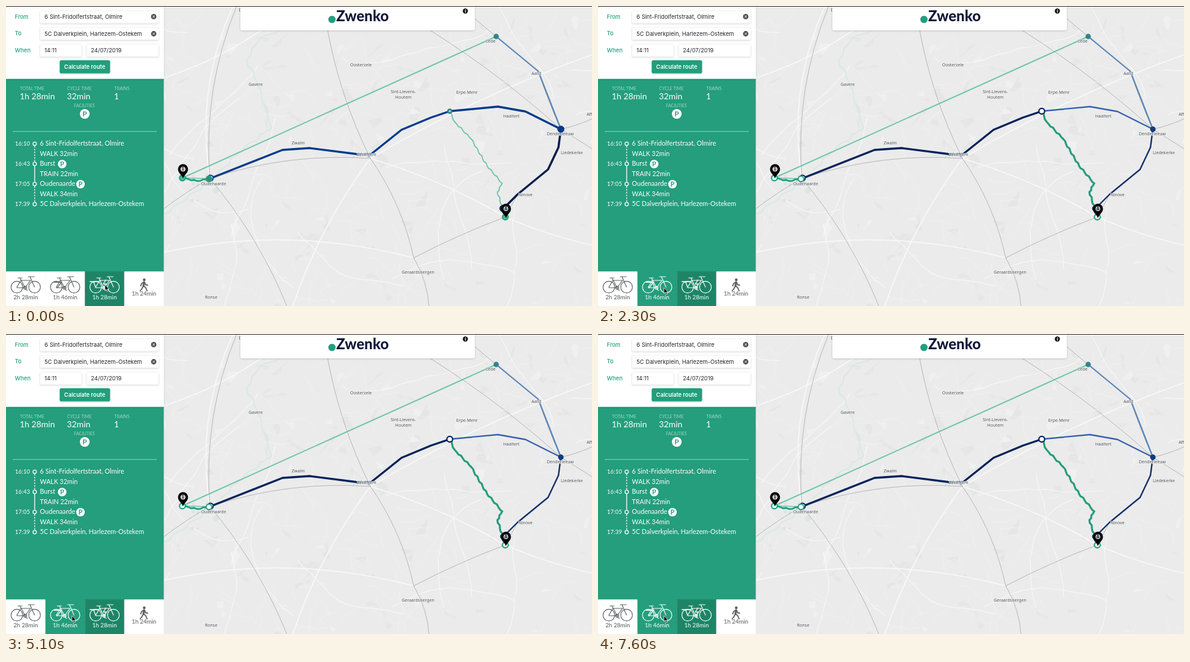
These frames come from a looping animation (960x492 px, 7.7 s). An HTML page:

```html
<!DOCTYPE html>
<html lang="nl">
<head>
<meta charset="utf-8">
<title>Route planner</title>
<style>
  html, body { margin: 0; width: 100%; height: 100%; overflow: hidden; background: #ebebeb; }
  svg { display: block; width: 960px; height: 492px; }
  text { font-family: Lato, "Liberation Sans", sans-serif; }
  .form text { font-family: Inter, "Liberation Sans", sans-serif; }
  .labels text { font: 7px "Noto Sans", "Open Sans", sans-serif; fill: #50565a; text-anchor: middle;
    stroke: #f1f1f1; stroke-width: 1.4px; paint-order: stroke; stroke-linejoin: round; }
  .line { fill: none; stroke-linejoin: round; stroke-linecap: round; }
</style>
</head>
<body>
<svg viewBox="0 0 960 492" xmlns="http://www.w3.org/2000/svg">
  <defs>
    <filter id="shadow" x="-10%" y="-40%" width="120%" height="190%">
      <feDropShadow dx="0" dy="1" stdDeviation="1.4" flood-color="#000" flood-opacity=".18"/>
    </filter>
    <clipPath id="mapClip"><rect x="258.5" width="701.5" height="492"/></clipPath>
  </defs>
  <g clip-path="url(#mapClip)">
    <g id="base"></g>
    <g id="routes"></g>
    <g id="labels" class="labels"></g>
    <g id="nodes"></g>
    <g id="pins"></g>
  </g>
  <g id="brand"></g>
  <rect y="119" width="258.5" height="317" fill="#249e7c"/>
  <g id="panel"></g>
  <g id="form" class="form"></g>
  <g id="tiles"></g>
  <rect width="960" height="1" fill="#27292c"/>
  <path id="cursor" d="M0 0V9.6L2.2 7.6 3.8 11 5.5 10.2 4 7H7Z" fill="#111" stroke="#fff" stroke-width=".7"/>
</svg>
<script>
const $ = id => document.getElementById(id);
const GREEN = '#249e7c', DARK = '#1d8566', PALE = '#6fc5aa', NAVY = '#04235a', BLUE = '#003a8c';
const FROM = '6 Sint-Fridolfertstraat, Olmire';
const TO = '5C Dalverkplein, Harlezem-Ostekem';
const LOOP = 7700;

let seed = 41;
const rnd = () => (seed = (seed * 16807) % 2147483647) / 2147483647;
const spot = () => [258 + rnd() * 702, rnd() * 492];
const clamp = k => Math.min(1, Math.max(0, k));
const smooth = k => k * k * (3 - 2 * k);
const mix = (a, b, k) => a + (b - a) * k;

// Drawing helpers
const text = (x, y, s, size, fill, more = '') =>
  `<text x="${x}" y="${y}" font-size="${size}" fill="${fill}" ${more}>${s}</text>`;
const path = (d, color, width, more = '') =>
  `<path class="line" d="${d}" stroke="${color}" stroke-width="${width}" ${more}/>`;
const line = (pts, ...style) => path('M' + pts.join('L'), ...style);
const dot = (x, y, r, fill, stroke = 'none', width = 0) =>
  `<circle cx="${x}" cy="${y}" r="${r}" fill="${fill}" stroke="${stroke}" stroke-width="${width}"/>`;
const rect = (x, y, w, h, fill, more = '') =>
  `<rect x="${x}" y="${y}" width="${w}" height="${h}" fill="${fill}" ${more}/>`;
const MID = 'text-anchor="middle" ';
const BOLD = 'font-weight="700"';

// A curve between two places, bent sideways by a share of its length
function bow([x, y], [u, v], bend = 0) {
  const cx = (x + u) / 2 - (v - y) * bend, cy = (y + v) / 2 + (u - x) * bend;
  return `M${x} ${y}Q${cx} ${cy} ${u} ${v}`;
}

// Points along a polyline, shaken a little from side to side
function meander(keys, step, amp) {
  const out = [];
  keys.slice(1).forEach(([u, v], i) => {
    const [x, y] = keys[i], len = Math.hypot(u - x, v - y), n = Math.ceil(len / step);
    for (let j = 0; j < n; j++) {
      const off = j ? amp * Math.sin((out.length + 1) * 2.1) : 0;
      out.push([mix(x, u, j / n) - (v - y) / len * off, mix(y, v, j / n) + (u - x) / len * off]);
    }
  });
  return [...out, keys[keys.length - 1]];
}

function wander(steps, len, turn) {
  let [x, y] = spot(), a = rnd() * 6.283;
  return Array.from({ length: steps }, () => {
    a += (rnd() - .5) * turn;
    return [(x += Math.cos(a) * len).toFixed(1), (y += Math.sin(a) * len).toFixed(1)];
  });
}

// Places
const home = [818, 346], goal = [289, 282], oude = [334, 283], zott = [597, 250], burst = [727, 172.5];
const dender = [909, 202], lede = [803, 50], aalst = [872, 107], ninove = [838, 309], gera = [668, 413];

function drawBase() {
  let s = rect(258, 0, 702, 492, '#ebebeb');
  for (let i = 0; i < 120; i++) {
    s += `<polygon points="${wander(6, 4 + rnd() * 6, 3)}" fill="${i % 3 ? '#e5e6e5' : '#f0f0f0'}"/>`;
  }
  for (let i = 0; i < 230; i++) s += line(wander(7, 8, 1), '#f2f2f2', .8);
  for (let i = 0; i < 22; i++) s += line(wander(14, 16, .55), '#f7f7f7', 1.2);
  const roads = [[oude, [372, 0], -.15], [zott, [470, 492], .08], [zott, home, -.06], [gera, [258, 404], .12],
    [zott, [960, 80], -.05], [home, [960, 392], .05], [[258, 118], [470, 0], .1]];
  s += roads.map(([a, b, k]) => path(bow(a, b, k), '#f8f8f8', 1.8)).join('');
  const river = [[450, 38], [415, 55], [394, 88], [412, 128], [436, 200], [392, 230], [334, 288], [258, 342]];
  s += line(meander(river, 11, 2.5), '#d5e8e2', 1.7);
  for (let i = 0; i < 8; i++) {
    s += dot(298 + rnd() * 46, 276 + rnd() * 45, 2 + rnd() * 3, '#d9e7df');
  }
  const rails = [[[258, 333], oude, -.04], [oude, zott, -.1], [[527, 40], zott, .07], [zott, gera, -.1],
    [gera, home, -.03], [gera, [693, 492], -.12], [home, ninove], [[659, 18], dender, -.05],
    [dender, [960, 234], 0], [[768, 21], aalst, 0], [aalst, dender, .03], [dender, [960, 185], .06],
    [oude, [460, 492], -.08], [[378, 0], oude, .12]];
  s += rails.map(([a, b, k]) => path(bow(a, b, k), '#a5a8aa', .8)).join('');
  $('base').innerHTML = s;
}

// Routes
const west = [oude, [453, 236], [497, 233], [576, 243], [598, 243], [648, 203], [696, 183], burst];
const middle = [burst, [806, 165], [851, 173], dender];
const south = [dender, [905, 232], [888, 268], ninove, [818, 329]];
const firstWalk = meander([burst, [735, 190], [762, 218], [788, 262], [813, 291], [805, 305], home], 5, 1.1);
const lastWalk = meander([goal, [313, 287], [333, 283.5]], 6, .9);

function drawRoutes(mode) {
  const bike = mode === 'B';
  $('routes').innerHTML =
    line([lede, goal], PALE, 2) + line([goal, oude], PALE, 1.3) +
    line([lede, aalst, dender], '#5583b8', 2.1) +
    line(firstWalk, bike ? GREEN : PALE, bike ? 3.2 : 1.9) +
    line(lastWalk, GREEN, 2.8) +
    line(south, bike ? '#12306a' : '#031d4e', bike ? 2.4 : 3.5) +
    line(middle, bike ? '#3562ad' : BLUE, bike ? 2.3 : 3.4) +
    line(west, bike ? NAVY : BLUE, 3.4);
}

function drawNodes(mode) {
  const busy = mode === 'mid', bike = mode === 'B';
  const end = busy ? '#55b899' : '#fff', rail = bike ? NAVY : BLUE;
  const stop = (p, full, fill, color) => full ? dot(...p, 4.7, fill, color, 2.2) : dot(...p, 4.2, '#2c7e85');
  $('nodes').innerHTML =
    dot(...lede, 4.4, '#33858b') +
    dot(335, 282, 4.5, '#fff', rail, 2) +
    dot(332.5, 283.5, 4.5, busy ? '#2d8c86' : '#fff', GREEN, 2) +
    stop(goal, true, end, GREEN) +
    stop(burst, bike, '#fff', NAVY) + (busy ? dot(...burst, 1.8, '#a8d5d3') : '') +
    (bike ? dot(...dender, 4.5, '#143a7b') : stop(dender, true, busy ? BLUE : '#fff', BLUE)) +
    dot(814, 332, bike ? 3.5 : 4.7, '#345280', '#031d4e', 2) +
    stop(home, true, end, GREEN);
}

function drawLabels() {
  $('labels').innerHTML = [
    ['Oosterzele', 581.5, 99], ['Gavere', 409, 131], ['Sint-Lievens-', 651, 143], ['Houtem', 651, 152],
    ['Erpe-Mere', 755, 144], ['Haaltert', 828, 183], ['Zwalm', 479, 227], ['Zottegem', 590.5, 246],
    ['Oudenaarde', 340, 294], ['Denderleeuw', 908, 211.5], ['Liedekerke', 927, 242.5],
    ['Ninove', 851, 311.5], ['Geraardsbergen', 675, 439], ['Ronse', 336, 479.5], ['Lede', 794, 60],
    ['Aalst', 869, 113], ['Affligem', 965, 180], ['De Pinte', 395, 9]
  ].map(([s, x, y]) => `<text x="${x}" y="${y}">${s}</text>`).join('');
}

const pin = (x, y, s) => `<g transform="translate(${x} ${y})">
  <path d="M0 15C-2 9-8.3 6-8.3-.4A8.3 8.3 0 0 1 8.3-.4C8.3 6 2 9 0 15Z" fill="#050606"/>
  ${dot(0, -.6, 3.9, s === 'A' ? '#b9c8d6' : '#fff')}${text(0, 2, s, 7, '#111', MID + BOLD)}</g>`;

// Side panel
const pBadge = (x, y, r) => dot(x, y, r, '#fff') + text(x, y + r * .53, 'P', r * 1.5, GREEN, MID + BOLD);
const bikeBadge = (x, y) => dot(x, y, 7, '#fff') +
  path(`M${x - 4} ${y - 4}v8h3v-5h4m-2 4l3-7`, GREEN, 1.2) + dot(x + 2, y + 2, 2, 'none', GREEN, 1);

const trips = {
  A: { sums: ['1h 46min', '6min', '2'], stops: [
    ['16:45', FROM, 'WALK 6min'], ['16:51', 'Eichem', 'TRAIN 13min', 101],
    ['17:25', 'Denderleeuw', 'TRAIN 32min', 125, 144], ['17:57', 'Oudenaarde', 'WALK 34min', 122], ['18:31', TO]] },
  B: { sums: ['1h 28min', '32min', '1'], stops: [
    ['16:10', FROM, 'WALK 32min'], ['16:43', 'Burst', 'TRAIN 22min', 92],
    ['17:05', 'Oudenaarde', 'WALK 34min', 122], ['17:39', TO]] }
};

function drawPanel(mode) {
  const { sums, stops } = trips[mode], soft = '#a3d6c6';
  let s = ['TOTAL TIME', 'CYCLE TIME', 'TRAINS'].map((head, i) =>
    text(23 + i * 77.3, 138, head, 7.1, soft) + text(22.5 + i * 77.3, 153, sums[i], 13.8, '#fff')).join('');
  s += text(128.5, 165.5, 'FACILITIES', 7, soft, MID) + pBadge(129, 177, 8);
  s += rect(11, 205.3, 236, 1, '#9bd1c0');
  stops.forEach(([time, name, leg, park, bikes], i) => {
    const y = 226 + i * 33;
    if (leg) {
      const dash = leg[0] === 'W' ? 'stroke-dasharray="1.6 3"' : '';
      s += line([[47, y + 4], [47, y + 29]], '#fff', 1.3, dash);
      s += text(55.5, y + 19.7, leg, 10.5, '#fff');
    }
    s += text(14.8, y + 3.3, time, 9.5, '#fff') + dot(47, y, 2.8, GREEN, '#fff', 1.3);
    s += text(55.5, y + 3.3, name, 10.7, '#fff');
    if (park) s += pBadge(park, y + .3, 7);
    if (bikes) s += bikeBadge(bikes, y + .3);
  });
  $('panel').innerHTML = s;
}

function drawForm() {
  const field = (x, y, w, s) =>
    rect(x, y, w, 20, '#fff', 'rx="2" stroke="#ececec" stroke-width=".6" filter="url(#shadow)"') +
    text(x + 7, y + 13.3, s, 9.3, '#24282b');
  const clear = y => dot(242, y, 4.4, '#4b4e50') + path(`M240.4 ${y - 1.6}l3.2 3.2m0-3.2l-3.2 3.2`, '#fff', 1);
  $('form').innerHTML = rect(0, 0, 258.5, 119.5, '#fff', 'filter="url(#shadow)"') +
    ['From', 'To', 'When'].map((s, i) => text(14.5, 21 + i * 27.4, s, 9.2, GREEN, 'font-weight="500"')).join('') +
    field(56, 8, 194, FROM) + field(56, 35.3, 194, TO) + field(56, 62.8, 68, '14:11') +
    field(132, 62.8, 118, '24/07/2019') + clear(17.4) + clear(45.5) +
    rect(88, 89, 82.5, 21.5, GREEN, 'rx="2.5" filter="url(#shadow)"') +
    text(129, 103.2, 'Calculate route', 9.2, '#fff', MID + 'font-weight="600"');
}

function drawBrand() {
  $('brand').innerHTML = rect(384, -6, 384, 46, '#fff', 'rx="4" filter="url(#shadow)"') +
    dot(534, 22, 6, GREEN) +
    text(584, 25, 'Zwenko', 24, '#11193a', MID + 'font-weight="800"') +
    dot(752.5, 8.3, 4.2, '#151719') + rect(752, 7.5, 1.3, 3.2, '#fff') + rect(752, 5.6, 1.3, 1.2, '#fff');
}

// Mode tiles
const TILE = 64.6;
const extras = ['', 'M-18-8H-6L-13 1', 'M-24-9H-9M-18-9L-15 0M2-12l-4 7h5l-4 7'];

const bikeIcon = (x, color, kind) => `<g transform="translate(${x} 461)">
  ${[-14.5, 14.5].map(w => dot(w, 0, 9.6, 'none', color, 1.15)).join('')}
  ${path('M-14.5 0L-8-11H8L-1 1H-14.5M-1 1L-9-14M-13-15H-6M14.5 0L7-17H14M7-17H4M-1 1l2 4h2', color, 1.15)}
  ${dot(-1, 1, 2.5, 'none', color, 1.15)}${path(extras[kind] || 'M0 0', color, 1.3)}</g>`;

const walker = `<g transform="translate(226 457)">${dot(.5, -8, 2.3, '#626568')}
  ${path('M0-4L-1 2 3 5 5 10M-1 2L-3 6-6 10M0-4L-4-2-5 2M1-4L3 0 6 1', '#626568', 1.9)}
  ${path('M0-4L-.6 2', '#626568', 3.6)}</g>`;

function drawTiles(picked, hover) {
  $('tiles').innerHTML = ['2h 28min', '1h 46min', '1h 28min', '1h 24min'].map((s, i) => {
    const fill = i === picked ? DARK : i === hover ? GREEN : '#fff';
    const on = fill !== '#fff', x = (i + .5) * TILE;
    return rect(i * TILE, 435.3, TILE, 57, fill) +
      (i < 3 ? bikeIcon(x, on ? '#fff' : '#5b5e61', i) : walker) +
      text(x, i < 3 ? 481 : 475.3, s, 9.6, on ? '#fff' : '#55585b', MID);
  }).join('');
}

// Clicks alternate between the e-bike tile (B) and the bike tile (A)
const clicks = [-80, 700, 1600, 2500, 3400, 4050, 4650, 5350, 6150, 6650, 7050, LOOP + 100];
const target = { A: [108, 462], B: [162, 457] };
const travel = { A: [.55, .95], B: [.15, .6] };

const shown = {};
function update(name, key, draw) {
  if (shown[name] === key) return;
  shown[name] = key;
  draw();
}

function render(t) {
  const next = clicks.findIndex(c => c > t), since = clicks[next - 1];
  const mode = next % 2 ? 'B' : 'A', other = next % 2 ? 'A' : 'B';
  const [go, stop] = travel[mode];
  const k = smooth(clamp(((t - since) / (clicks[next] - since) - go) / (stop - go)));
  const [x, y] = target[mode].map((v, i) => mix(v, target[other][i], k));

  const picked = mode === 'A' ? 1 : 2, hover = Math.floor(x / TILE);
  const busy = t - since < 170;
  const lines = busy ? other : mode, nodes = busy ? 'mid' : mode;
  update('panel', mode, () => drawPanel(mode));
  update('tiles', picked + ',' + hover, () => drawTiles(picked, hover));
  update('routes', lines, () => drawRoutes(lines));
  update('nodes', nodes, () => drawNodes(nodes));
  $('cursor').setAttribute('transform', `translate(${x.toFixed(2)} ${y.toFixed(2)})`);
}

drawBase();
drawLabels();
drawForm();
drawBrand();
$('pins').innerHTML = pin(290, 268, 'B') + pin(819, 333, 'A');

const start = performance.now();
function tick() {
  render((performance.now() - start) % LOOP);
  requestAnimationFrame(tick);
}
render(0);
requestAnimationFrame(tick);
</script>
</body>
</html>
```
